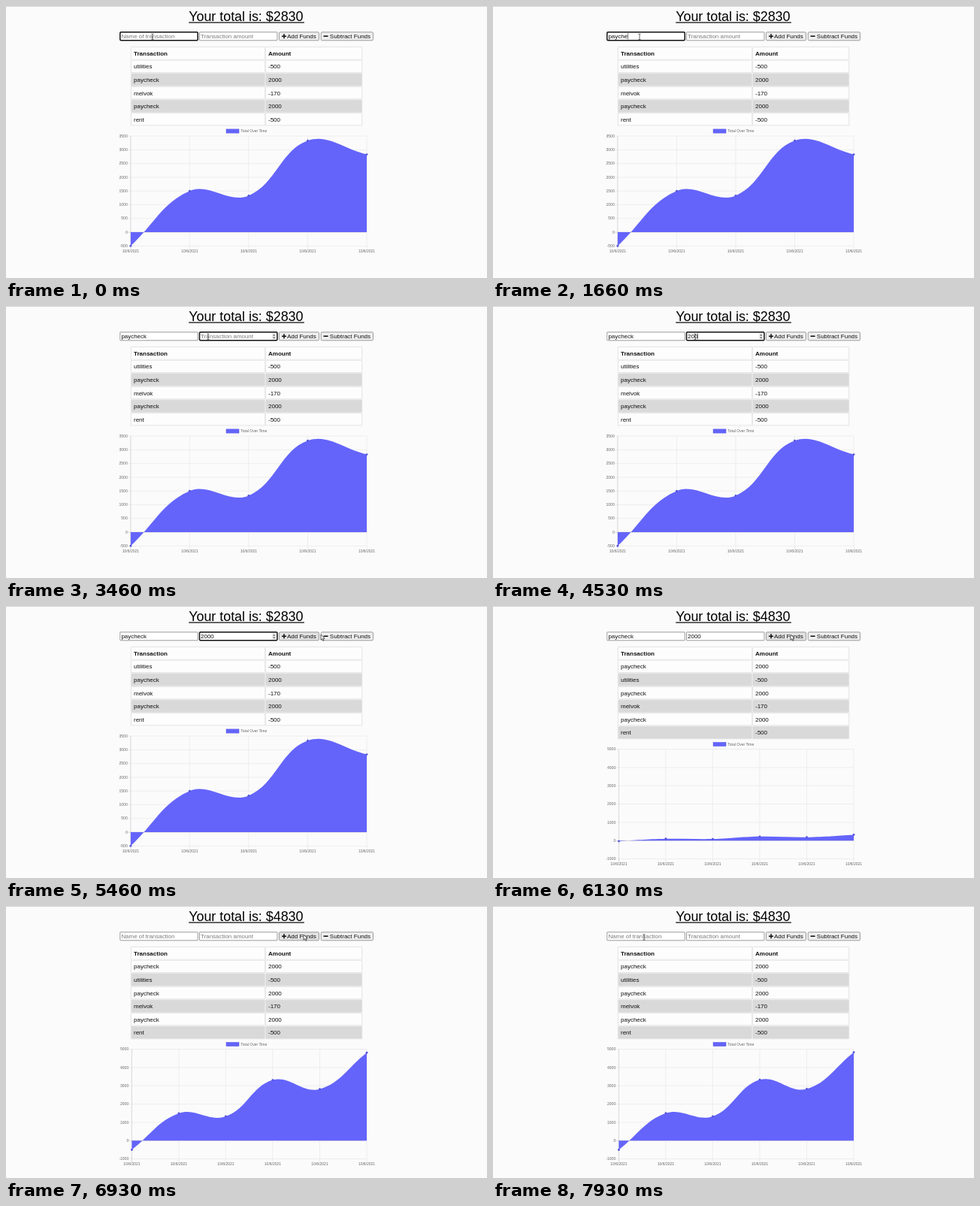
Write an HTML page that moves like this. It is 640 px wide and 362 px high and loops after 8 s.

```html
<!DOCTYPE html>
<html lang="en">
<head>
<meta charset="utf-8">
<title>Budget tracker</title>
<style>
html, body { margin: 0; width: 100%; height: 100%; overflow: hidden; background: #fbfbfb; }
svg { display: block; width: 100vw; height: 100vh; font-family: "Liberation Sans", Arial, sans-serif; }
</style>
</head>
<body>
<svg id="stage" viewBox="0 0 640 362"></svg>
<script>
const stage = document.getElementById('stage');
const LOOP = 8000;
const BLUE = '#6464fb';
const POST = 6100, CLEAR = 6190, PRESS = 6000, FOCUS = 2900;
const nameKeys = [700, 850, 1020, 1220, 1410, 1600, 1790, 1960];
const amountKeys = [3900, 4130, 4340, 4550];
const mousePath = [
  [0, 195, 41], [2500, 195, 41], [2850, 269, 41], [4950, 269, 41],
  [5430, 419, 38], [5500, 419, 38], [5800, 396, 38], [7250, 396, 38], [7800, 201, 41.5]
];
const before = [['rent', -500], ['paycheck', 2000], ['melvok', -170], ['paycheck', 2000], ['utilities', -500]];
const after = [...before, ['paycheck', 2000]];

const rect = (x, y, w, h, fill, extra = '') =>
  `<rect x="${x}" y="${y}" width="${w}" height="${h}" fill="${fill}" ${extra}/>`;
const text = (x, y, s, size = 8, fill = '#111', extra = '') =>
  `<text x="${x}" y="${y}" font-size="${size}" fill="${fill}" ${extra}>${s}</text>`;
const path = (d, fill, extra = '') => `<path d="${d}" fill="${fill}" ${extra}/>`;
const line = (d, color, width) => path(d, 'none', `stroke="${color}" stroke-width="${width}"`);
const typed = (word, keys, t) => word.slice(0, keys.filter(k => k <= t).length);

function mouseAt(t) {
  let a = mousePath[0];
  for (const b of mousePath) {
    if (t < b[0]) {
      const p = (t - a[0]) / (b[0] - a[0]);
      const e = p * p * (3 - 2 * p);
      return [a[1] + (b[1] - a[1]) * e, a[2] + (b[2] - a[2]) * e];
    }
    a = b;
  }
  return [a[1], a[2]];
}

function field(x, value, hint, focused, caret, spinner) {
  const border = focused ? 'stroke="#111" stroke-width="1.5" rx="1.2"' : 'stroke="#858585" stroke-width=".8" rx=".4"';
  let s = rect(x, 34.8, 103.4, 11, '#fff', border);
  s += value ? text(x + 1.6, 43, value, 7.95) : text(x + 1.6, 43, hint, 7.95, '#7b7b7b');
  if (caret) {
    const wide = { p: .556, a: .556, y: .5, c: .5, h: .556, e: .556, k: .5 };
    const w = [...value].reduce((n, c) => n + (wide[c] || .556) * 7.95, 0);
    s += rect(x + 1.6 + w, 36.3, .6, 8, '#111');
  }
  if (spinner) {
    s += rect(x + 96, 36, 6.2, 8.8, '#efefef');
    s += path(`M${x + 97.4} 39.4l1.7 -2 1.7 2zM${x + 97.4} 41.4l1.7 2 1.7 -2z`, '#555');
  }
  return s;
}

function button(x, w, label, labelX, icon, hover) {
  return rect(x, 34.8, w, 11, hover ? '#e2e2e2' : '#efefef', 'rx="1.3" stroke="#858585" stroke-width=".8"')
    + line(icon, '#111', 1.6) + text(labelX, 43, label, 8);
}

function table(rows) {
  let s = rect(165.9, 54, 308.2, 17.55 * (rows.length + 1) + .6, '#fff', 'stroke="#eee" stroke-width=".5"');
  [['Transaction', 'Amount'], ...rows.slice().reverse()].forEach(([a, b], i) => {
    const y = 54.7 + 17.55 * i;
    const fill = i && i % 2 === 0 ? '#d9d9d9' : '#fdfdfd';
    const edge = 'stroke="#dedede" stroke-width=".7"';
    const bold = i ? '' : 'font-weight="700"';
    s += rect(166.7, y, 177.6, 16.4, fill, edge) + rect(345.7, y, 127.7, 16.4, fill, edge);
    s += text(170, y + 11.2, a, 8, '#111', bold) + text(349, y + 11.2, b, 8, '#111', bold);
  });
  return s;
}

// Control points of a cardinal spline with distance weighting
function controls(pts, i) {
  const p = pts[i], a = pts[i - 1] || p, b = pts[i + 1] || p;
  const da = Math.hypot(p[0] - a[0], p[1] - a[1]);
  const db = Math.hypot(p[0] - b[0], p[1] - b[1]);
  const fa = .4 * da / (da + db), fb = .4 * db / (da + db);
  const dx = b[0] - a[0], dy = b[1] - a[1];
  return [[p[0] - fa * dx, p[1] - fa * dy], [p[0] + fb * dx, p[1] + fb * dy]];
}

function chart(rows, o, grow) {
  const { left, top, bottom, min, max, step } = o;
  const right = 480;
  const yOf = v => bottom - (v - min) / (max - min) * (bottom - top);
  const zero = yOf(0);
  let sum = 0;
  const pts = rows.map(([, v], i) =>
    [left + (right - left) * i / (rows.length - 1), yOf(o.start[i] ?? (sum + v)), sum += v]);

  let s = rect(293, top - 9.2, 17, 5.2, BLUE, 'stroke="#5a5ae2" stroke-width=".5"');
  s += text(312.3, top - 4.8, 'Total Over Time', 5, '#666');
  for (let v = min; v <= max; v += step) {
    const y = yOf(v);
    s += line(`M${left - 4} ${y}H${right}`, v ? '#e8e8e8' : '#c4c4c4', .7);
    s += text(left - 4.2, y + 1.7, v, 5, '#666', 'text-anchor="end"');
  }
  pts.forEach(([x], i) => {
    s += line(`M${x} ${top}V${bottom + 4}`, i ? '#e8e8e8' : '#c8c8c8', .7);
    s += text(x, bottom + 8.6, '10/6/2021', 5, '#666', 'text-anchor="middle"');
  });

  const at = ([x, y]) => `${x.toFixed(2)} ${(zero + (y - zero) * grow).toFixed(2)}`;
  let d = `M${left} ${zero}L${at(pts[0])}`;
  for (let i = 1; i < pts.length; i++)
    d += `C${at(controls(pts, i - 1)[1])} ${at(controls(pts, i)[0])} ${at(pts[i])}`;
  s += path(d + `L${right} ${zero}Z`, BLUE);
  for (const p of pts) {
    const [x, y] = at(p).split(' ');
    s += `<circle cx="${x}" cy="${y}" r="1.45" fill="#5555dc"/>`;
  }
  return s;
}

function cursor([x, y]) {
  if (x > 363 && x < 489)
    return path(`M${x} ${y}v7.2l1.7 -1.6 1.3 2.7 1.1 -.5 -1.2 -2.6h2.3z`, '#fff', 'stroke="#222" stroke-width=".7"');
  return line(`M${x - 1.5} ${y - 3.7}h1.1l.4 .4 .4 -.4h1.1M${x} ${y - 3.5}v7M${x - 1.5} ${y + 3.7}h1.1l.4 -.4 .4 .4h1.1`, '#222', .7);
}

function render(t) {
  const done = t >= POST;
  const rows = done ? after : before;
  const mouse = mouseAt(t);
  const name = t < CLEAR ? typed('paycheck', nameKeys, t) : '';
  const amount = t < CLEAR ? typed('2000', amountKeys, t) : '';
  const onName = t < FOCUS, onAmount = t >= FOCUS && t < PRESS;
  const lastKey = [-600, ...nameKeys, FOCUS, ...amountKeys].filter(k => k <= t).pop();
  const blink = (t - lastKey) % 1060 < 530;
  const overAmount = mouse[0] > 257 && mouse[0] < 361;
  const overAdd = mouse[0] > 363 && mouse[0] < 420;
  const p = Math.min(1, Math.max(0, (t - 6112) / 1104));
  const grow = 1 - Math.pow(1 - p, 4);

  let s = rect(0, 0, 640, 362, '#fbfbfb') + rect(0, 0, 640, 1, '#d6d6d6');
  s += text(243.2, 19.8, `Your total is: $${done ? 4830 : 2830}`, 17.87, '#000');
  s += rect(243.2, 21.4, 153.6, 1.2, '#000');
  s += field(151.8, name, 'Name of transaction', onName, onName && blink);
  s += field(257.5, amount, 'Transaction amount', onAmount, onAmount && blink, onAmount || overAmount);
  s += button(363.4, 53, 'Add Funds', 374, 'M367 40.2h6M370 37.2v6', overAdd);
  s += button(419.2, 69.2, 'Subtract Funds', 430.8, 'M422.5 40.2h6', mouse[0] >= 420 && mouse[0] < 489);
  s += table(rows);
  s += done
    ? chart(rows, { left: 167.4, top: 190.6, bottom: 336.6, min: -1000, max: 5000, step: 1000, start: [] }, grow)
    : chart(rows, { left: 165.9, top: 173.1, bottom: 319.3, min: -500, max: 3500, step: 500, start: [] }, 1);
  stage.innerHTML = s + cursor(mouse);
}

function tick(now) {
  render(now % LOOP);
  requestAnimationFrame(tick);
}
render(0);
requestAnimationFrame(tick);
</script>
</body>
</html>
```
